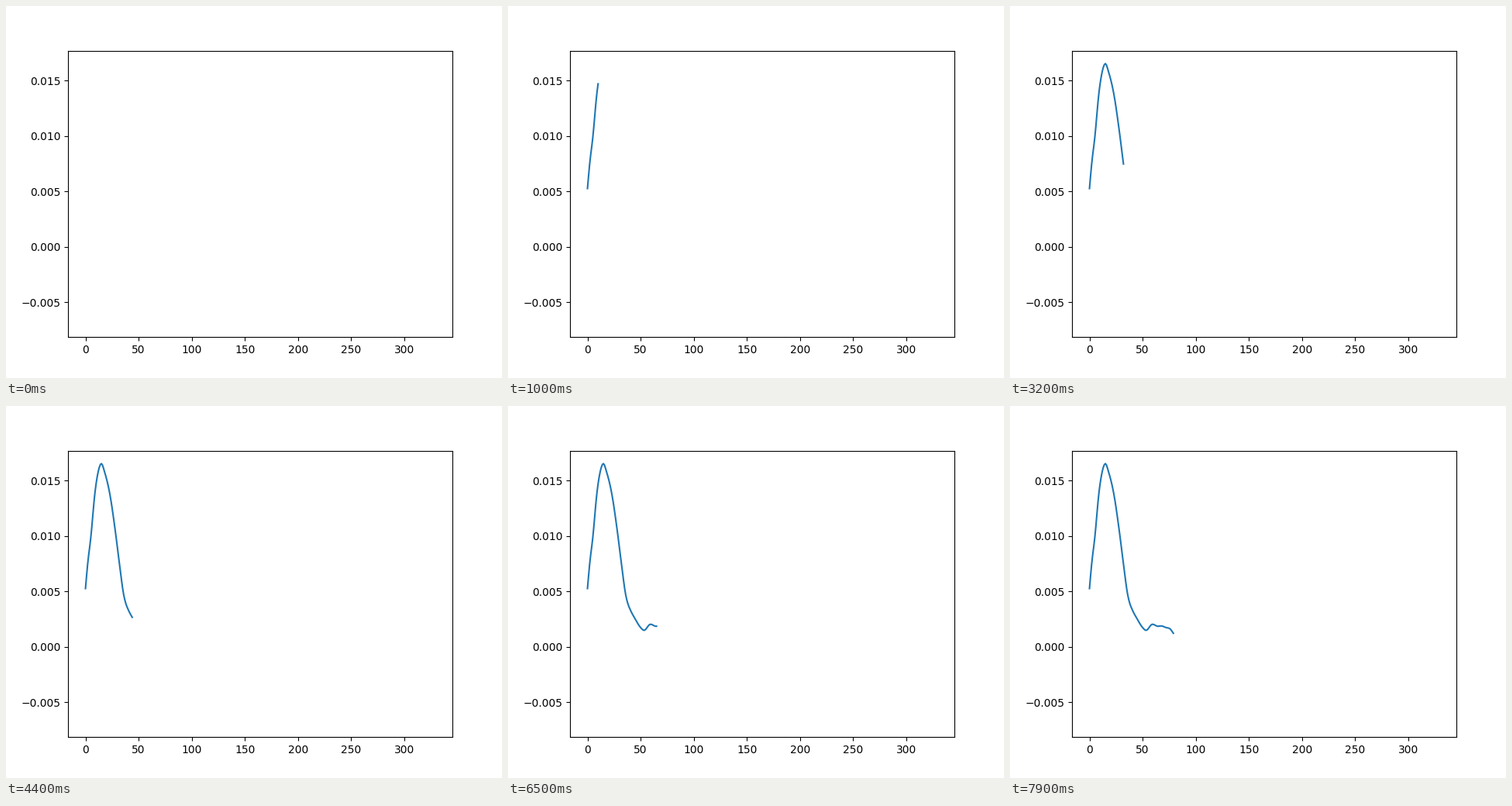
A matplotlib script that plays this animation: 640 by 480 pixels, repeating every 8 s.

```python
import numpy as np
import matplotlib.pyplot as plt
from matplotlib.animation import FuncAnimation

FRAMES = 80
INTERVAL = 100

# Turning points of the curve: (sample index, value in thousandths).
KEYS = [(0, 5.26), (2, 7.42), (5, 9.85), (9, 13.98), (12, 15.82),
        (15, 16.54), (18, 15.78), (23, 13.76), (28, 10.51), (32, 7.48),
        (36, 4.69), (38, 3.9), (40, 3.41), (45, 2.5), (50, 1.74),
        (53, 1.49), (59, 2.03), (64, 1.86), (68, 1.88), (72, 1.74),
        (76, 1.61), (79, 1.22)]


def smooth(x, keys):
    """Cubic Hermite curve through the key points."""
    kx, ky = np.array(keys, dtype=float).T
    slope = np.gradient(ky, kx)
    k = np.clip(np.searchsorted(kx, x, side="right") - 1, 0, len(kx) - 2)
    h = kx[k + 1] - kx[k]
    t = (x - kx[k]) / h
    ease = t * t * (3 - 2 * t)
    return (ky[k] + (ky[k + 1] - ky[k]) * ease
            + h * t * (1 - t) * ((1 - t) * slope[k] - t * slope[k + 1]))


xs = np.arange(FRAMES)
ys = smooth(xs, KEYS) / 1000

fig, ax = plt.subplots(figsize=(6.4, 4.8), dpi=100)
line, = ax.plot([], [], color="tab:blue", lw=1.5)
ax.set_xlim(-16.45, 345.45)
ax.set_ylim(-0.00815, 0.01771)
ax.set_xticks(range(0, 301, 50))
ax.set_yticks(np.arange(-1, 4) * 0.005)


def update(i):
    line.set_data(xs[:i + 1], ys[:i + 1])
    return line,


anim = FuncAnimation(fig, update, frames=FRAMES, interval=INTERVAL,
                     repeat=True, repeat_delay=0)
plt.show()
```
